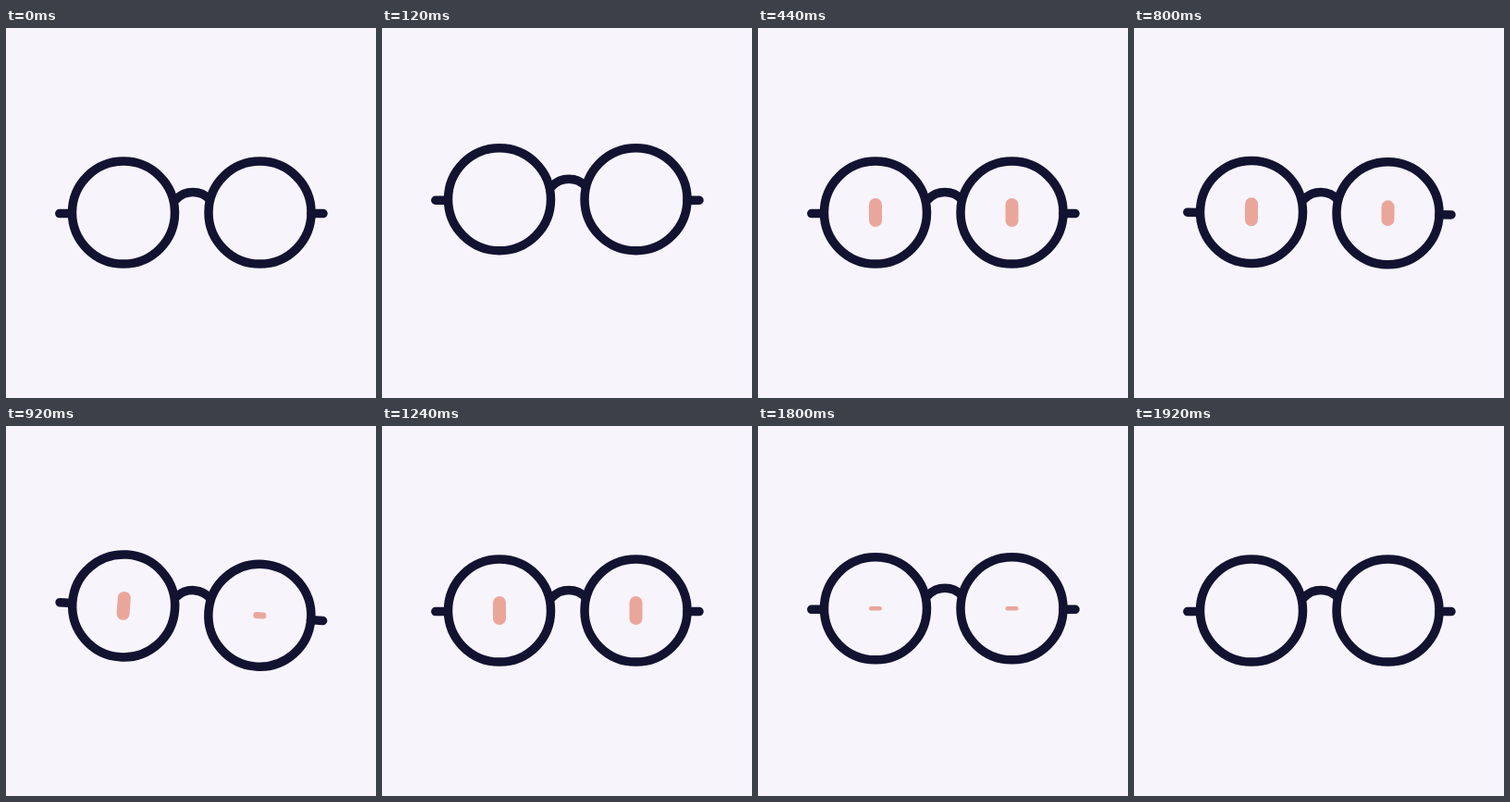
Write an HTML page that moves like this. It is 400 px wide and 400 px high and loops after 2000 ms.

```html
<!DOCTYPE html>
<html lang="en">
<head>
<meta charset="utf-8">
<title>Winking glasses</title>
<style>
  html, body { margin: 0; height: 100%; overflow: hidden; background: #f7f4fb; }
  svg { display: block; width: 100%; height: 100%; }
</style>
</head>
<body>
<svg viewBox="0 0 400 400">
  <g id="face">
    <g fill="#eba69b">
      <rect id="left" width="14"/>
      <rect id="right" width="14"/>
    </g>
    <g fill="none" stroke="#121331" stroke-width="9.5" stroke-linecap="round">
      <circle cx="127" cy="199.6" r="55.5"/>
      <circle cx="274.5" cy="199.6" r="55.5"/>
      <path d="M183.7 185.5A25 25 0 0 1 220.3 185.5M57.8 200.6H71M329.8 200.6H343"/>
    </g>
  </g>
</svg>
<script>
const LOOP = 2000, STEP = 40, EYE = 31, SHUT = 7;
const $ = id => document.getElementById(id);

// smooth 0 to 1 while t runs from a to b
function ease(t, a, b) {
  const u = Math.min(1, Math.max(0, (t - a) / (b - a)));
  return u * u * (3 - 2 * u);
}

function setEye(id, cx, h) {
  const box = { x: cx - 7, y: 199.5 - h / 2, height: h, rx: Math.min(7, h / 2) };
  for (const k in box) $(id).setAttribute(k, box[k]);
}

function draw(now) {
  const t = Math.floor(now % LOOP / STEP) * STEP;
  const hop = -17 * ease(t, 0, 160) + 25 * ease(t, 160, 312) - 8 * ease(t, 312, 433);
  const dip = 8 * ease(t, 1636, 1706) - 12 * ease(t, 1706, 1830) + 4 * ease(t, 1830, 1915);
  const open = EYE * (ease(t, 120, 270) - ease(t, 1706, 1830));
  const wink = ease(t, 765, 917) - ease(t, 1087, 1235);

  $('face').setAttribute('transform',
    `translate(0 ${hop + dip}) rotate(${4 * wink} 200.5 199.7)`);
  setEye('left', 127, open);
  setEye('right', 274.5, open - (EYE - SHUT) * wink);
}

let start;
function tick(now) {
  start ??= now;
  draw(now - start);
  requestAnimationFrame(tick);
}
draw(0);
requestAnimationFrame(tick);
</script>
</body>
</html>
```
